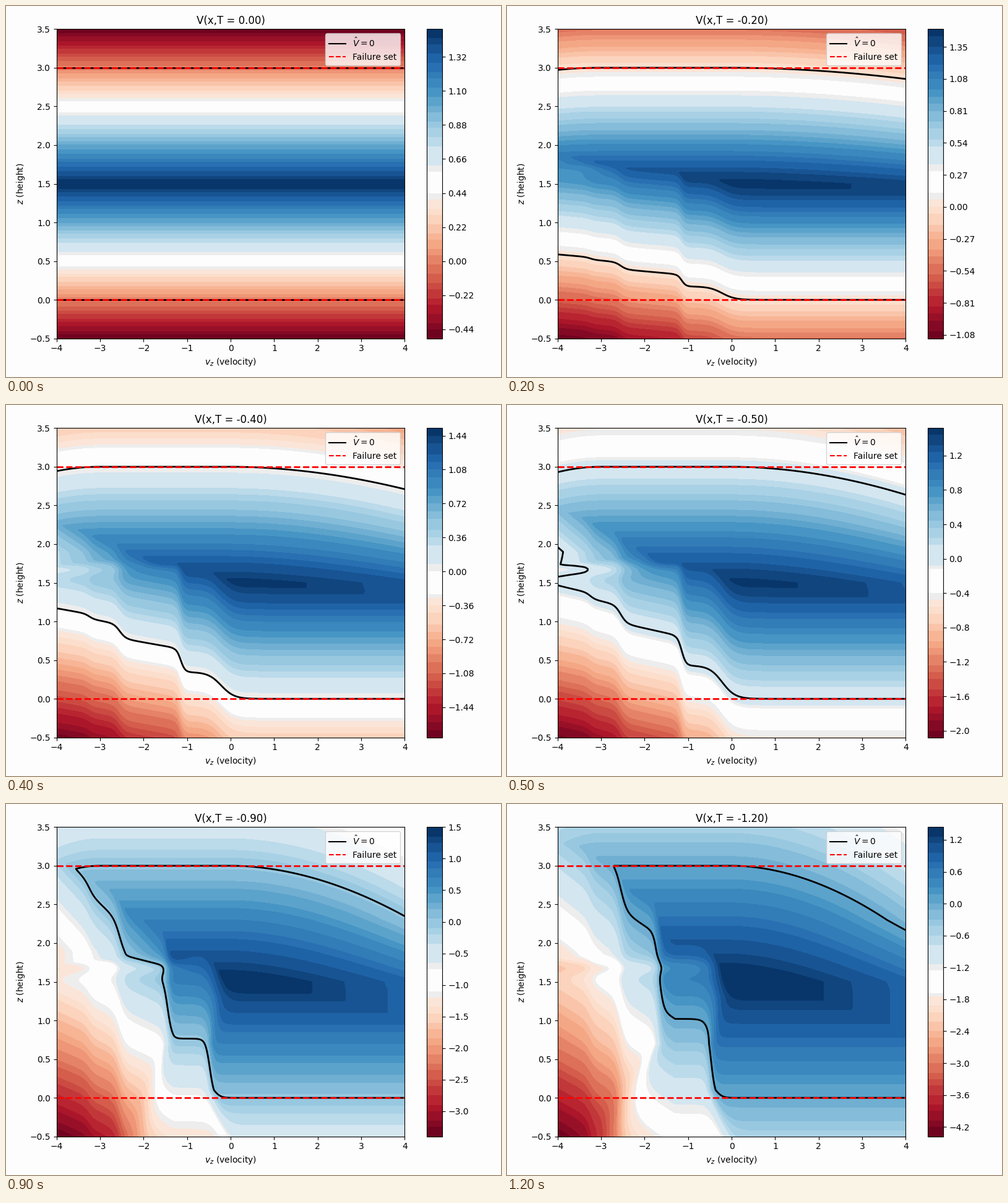
Write a matplotlib script that moves like this. It is 800 by 600 pixels and loops after 1.3 s.

```python
import numpy as np
import matplotlib.pyplot as plt
from matplotlib.animation import FuncAnimation
from matplotlib.colors import ListedColormap
from matplotlib.lines import Line2D

FRAMES, DT = 13, 0.1
PAPER = "#fdfdfd"

v, z = np.meshgrid(np.linspace(-4, 4, 321), np.linspace(-0.5, 3.5, 201))


def ramp(x, a, b):
    return np.clip((x - a) / (b - a), 0, 1)


def bell(x, centre, width):
    return np.exp(-((x - centre) / width) ** 2)


def step(x, centre, width):
    """Smooth step that is 1 left of centre and 0 right of it."""
    return 1 / (1 + np.exp(np.clip((x - centre) / width, -50, 50)))


def fall_rate(t):
    """Height lost per unit time: a staircase in v whose steps drift left."""
    late = ramp(t, 0.5, 0.9)
    drift = max(t - 0.5, 0)
    depth = ramp(-z, -0.7, 0.5)
    below = ramp(-z, -0.1, 0.5)
    sharp = late * (1 - 0.6 * ramp(z, 0.7, 1.3))

    brake = 0.85 * step(v, -0.22 - 0.26 * sharp + 0.35 * late * below,
                        0.15 - 0.1 * sharp + 0.06 * late * below)
    drop = 0.8 * step(v, -1.15 - drift * (0.75 + 1.6 * depth),
                      0.05 + 0.25 * drift * depth)
    slope = (0.25 + 0.04 * late) * np.maximum(-1.3 - v, 0)
    fast = 0.45 * step(v, -2.55, 0.07) + 0.15 * step(v, -3.25, 0.06)
    return (brake + drop + slope + fast) * (1 + 0.0535 * depth * ramp(t, 0, 0.3))


def climb_rate():
    """Height gained per unit time, from mid height up to the ceiling."""
    up = np.maximum(v, 0)
    mid = 0.065 * up ** 1.5
    top = 0.052 * up ** 1.9 + 0.14 * np.maximum(-3 - v, 0) ** 2
    return mid + (top - mid) * ramp(z, 1.4, 2.3)


CLIMB = climb_rate()


def value(t):
    grow = ramp(t, 0, 0.5)
    notch = 0.33 * step(v, -3.5 + 2.4 * t, 0.2) * bell(z, 1.69, 0.11)
    shelf = (0.5 * ramp(-v, 2, 4) ** 1.5 * ramp(z, 1.5, 1.9)
             * (1 - 0.75 * ramp(t, 0.9, 1.2)))
    ridge = (0.35 * ramp(t, 0.2, 0.5) * ramp(-t, -1.2, -0.7)
             * bell(v, -1.5, 0.5) * step(-z, -1.73, 0.03))

    low = z - t * fall_rate(t) - grow * np.maximum(notch, shelf) + ridge
    high = 1.5 - np.maximum(z - 1.5, 0) - t * CLIMB
    peak = 1.5 - 0.045 * t * t
    return np.round(np.minimum(np.minimum(low, high), peak), 7)


def levels_for(V):
    """About a hundred round levels that enclose the data."""
    lo, hi = V.min(), V.max()
    size = next(s for s in (0.02, 0.025, 0.03, 0.04, 0.05, 0.06, 0.08)
                if s >= (hi - lo) / 101)
    first = int(np.floor(round(lo / size, 5)))
    last = int(np.ceil(round(hi / size, 5)))
    return np.round(np.arange(first, last + 1) * size, 6)


def banded_cmap():
    """RdBu reduced to broad flat bands around a white middle."""
    white, grey = (0.47, 0.54), (0.45, 0.56)
    edges = np.concatenate([np.linspace(0, grey[0], 18), white, grey[1:],
                            np.linspace(0.62, 1, 15)])
    x = (np.arange(256) + 0.5) / 256
    out = plt.get_cmap("RdBu")(x)
    band = np.digitize(x, edges)
    for b in np.unique(band):
        out[band == b] = out[band == b].mean(axis=0)
    for (a, b), shade in ((grey, 237), (white, 253)):
        out[(x >= a) & (x < b), :3] = shade / 255
    return ListedColormap(out)


CMAP = banded_cmap()
fig = plt.figure(figsize=(8, 6), dpi=100, facecolor=PAPER)


def draw(i):
    t = i * DT
    V = value(t)
    fig.clear()
    ax = fig.add_subplot()
    fill = ax.contourf(v, z, V, levels=levels_for(V), cmap=CMAP)
    fig.colorbar(fill, ax=ax)
    ax.contour(v, z, V, levels=[0], colors="black", linewidths=2)
    for y in (0, 3):
        ax.axhline(y, color="red", ls="--", lw=2)
    ax.set(xlim=(-4, 4), ylim=(-0.5, 3.5), title=f"V(x,T = {-t if i else 0:.2f})",
           xlabel=r"$v_z$ (velocity)", ylabel=r"$z$ (height)")
    ax.legend(handles=[Line2D([], [], color="black", label=r"$\hat{V}=0$"),
                       Line2D([], [], color="red", ls="--", label="Failure set")],
              loc="upper right")
    fig.tight_layout()
    return []


anim = FuncAnimation(fig, draw, frames=FRAMES, init_func=lambda: draw(0),
                     interval=100, repeat=True, repeat_delay=0, blit=False)
plt.show()
```
